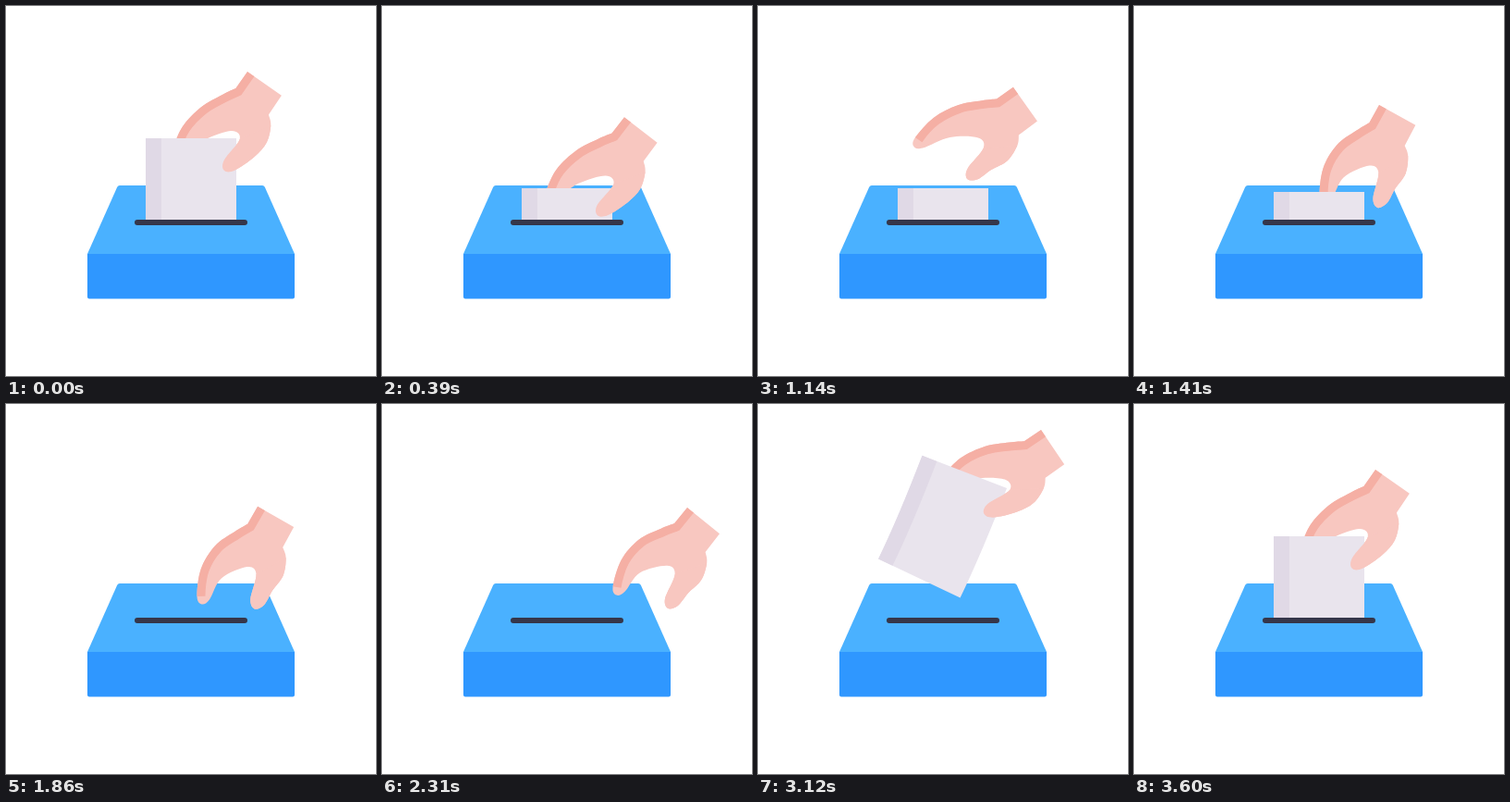
Write an HTML page with a canvas that moves like this. It is 400x400 px and loops after 5.63 s.

```html
<!DOCTYPE html>
<html>
<head>
<meta charset="utf-8">
<title>Voting</title>
<style>
html, body { margin: 0; height: 100%; overflow: hidden; background: #fff; }
canvas { display: block; }
</style>
</head>
<body>
<canvas id="stage" width="400" height="400"></canvas>
<script>
const ctx = document.getElementById('stage').getContext('2d');
const LOOP = 5630, MOVE_END = 3600, STEP = 30, CARRY = 2680, TILT = 35;
const SKIN = '#f8c7c0', SHADE = '#f5afa4';
const rad = deg => deg * Math.PI / 180;
const ease = s => (s = Math.max(0, Math.min(1, s)), s * s * (3 - 2 * s));

// Thumb tip and finger tip, measured from the cuff corner
const grip = [42, 94, -11, 114], open = [51, 90, -17, 120], curl = [51, 90, -2, 115];

// time, cuff x, cuff y, cuff angle, tips
const keys = [
  [0, 261, 71, TILT, ...grip],
  [330, 261, 122, TILT, ...grip],
  [720, 281, 84, 76, ...open],
  [900, 285, 78, 76, ...open],
  [1410, 265, 107, 29, ...curl],
  [1700, 268, 123, 29, ...curl],
  [2040, 283, 96, 32, ...curl],
  [2310, 330, 112, 39, ...curl],
  [2560, 510, 190, 50, ...curl],
  [CARRY, 450, -120, 100, ...grip],
  [2790, 369, -17, 86, ...grip],
  [3120, 306, 28, 56, ...grip],
  [MOVE_END, 261, 71, TILT, ...grip]
];

function slope(i, k) {
  const a = keys[i - 1], b = keys[i], c = keys[i + 1];
  if (!a || !c || (b[k] - a[k]) * (c[k] - b[k]) <= 0) return 0;
  return (c[k] - a[k]) / (c[0] - a[0]);
}

// Smooth path through the keys, resting at every turning point
function poseAt(t) {
  let i = 0;
  while (i < keys.length - 2 && t >= keys[i + 1][0]) i++;
  const a = keys[i], b = keys[i + 1], d = b[0] - a[0];
  const s = (t - a[0]) / d, r = 1 - s;
  return a.map((v, k) => v + (b[k] - v) * ease(s)
    + d * s * r * (r * slope(i, k) - s * slope(i + 1, k)));
}

// Three points round a tip that points away from its base
function tip(x, y, baseX, baseY, r) {
  const len = Math.hypot(x - baseX, y - baseY);
  const dx = (x - baseX) / len * r, dy = (y - baseY) / len * r;
  return [[x + dy, y - dx], [x + dx, y + dy], [x - dy, y + dx]];
}

const handPoints = (tx, ty, fx, fy) => [
  [45.5, 25], [54, 33], [61, 51], [59, 71],
  ...tip(tx, ty, 47, 66, 8),
  [35, 64.5], [22.5, 62.5], [4.5, 87],
  ...tip(fx, fy, -10, 88, 7),
  [0.4 * fx - 19, 89], [-19, 60], [-8, 36], [0, 22]
];

// Smooth curve through points i to j
function trace(pts, i, j) {
  const at = n => pts[Math.max(0, Math.min(pts.length - 1, n))];
  ctx.lineTo(...pts[i]);
  for (; i < j; i++) {
    const [a, b, c, d] = [at(i - 1), at(i), at(i + 1), at(i + 2)];
    ctx.bezierCurveTo(b[0] + (c[0] - a[0]) / 6, b[1] + (c[1] - a[1]) / 6,
      c[0] - (d[0] - b[0]) / 6, c[1] - (d[1] - b[1]) / 6, ...c);
  }
}

function fill(color, outline) {
  ctx.beginPath();
  outline();
  ctx.closePath();
  ctx.fillStyle = color;
  ctx.fill();
}

function drawBox() {
  fill('#4ab1ff', () => {
    ctx.moveTo(88, 268);
    ctx.arcTo(121, 194, 200, 194, 3);
    ctx.arcTo(279, 194, 312, 268, 3);
    ctx.lineTo(312, 268);
  });
  fill('#2f97ff', () => ctx.roundRect(88, 268, 224, 48.5, [0, 0, 2, 2]));
  fill('#35364a', () => ctx.roundRect(139, 231, 122, 6, 3));
}

function drawHand(pts) {
  const last = pts.length - 1;
  ctx.save();
  fill(SKIN, () => {
    ctx.moveTo(0, 0);
    ctx.lineTo(45, 0);
    trace(pts, 0, last);
  });
  ctx.clip();
  ctx.beginPath();
  trace(pts, last - 4, last);
  ctx.lineTo(0, -2);
  ctx.lineWidth = 18;
  ctx.strokeStyle = SHADE;
  ctx.stroke();
  ctx.restore();
}

// A sheet whose lower edge swings by the bend angle
function drawPaper(bend) {
  const c = Math.cos(rad(bend)), s = Math.sin(rad(bend));
  const foot = x => [49 - bend + (x - 49) * c, 125 + (x - 49) * s];
  const sheet = (right, color) => fill(color, () => {
    ctx.moveTo(0, 0);
    ctx.lineTo(right, 0);
    ctx.quadraticCurveTo(right, 72, ...foot(right));
    ctx.lineTo(...foot(0));
    ctx.quadraticCurveTo(0, 72, 0, 0);
  });
  sheet(98, '#e9e4ed');
  sheet(17, '#e0d9e6');
}

function draw(t) {
  const [, x, y, deg, ...tips] = poseAt(t);
  const hand = handPoints(...tips);
  const place = (angle, fn) => {
    ctx.save();
    ctx.translate(x, y);
    ctx.rotate(rad(angle));
    fn();
    ctx.restore();
  };
  ctx.clearRect(0, 0, 400, 400);
  drawBox();
  place(deg, () => drawHand(hand));

  // The slot swallows whatever lies below it
  ctx.save();
  ctx.beginPath();
  ctx.rect(0, 0, 400, 231);
  ctx.clip();
  if (t >= CARRY) {
    place(deg - TILT, () => {
      ctx.translate(-110, 72);
      drawPaper((deg - TILT) ** 2 / 100);
    });
  } else {
    ctx.translate(151, 143 + 54 * ease(t / 330) + 39 * ease((t - 1340) / 350));
    drawPaper(0);
  }
  ctx.restore();
  place(deg, () => fill(SKIN, () => trace(hand, 1, 7)));
}

function frame() {
  const t = Math.min(performance.now() % LOOP, MOVE_END);
  draw(Math.floor(t / STEP) * STEP);
  requestAnimationFrame(frame);
}
frame();
</script>
</body>
</html>
```
